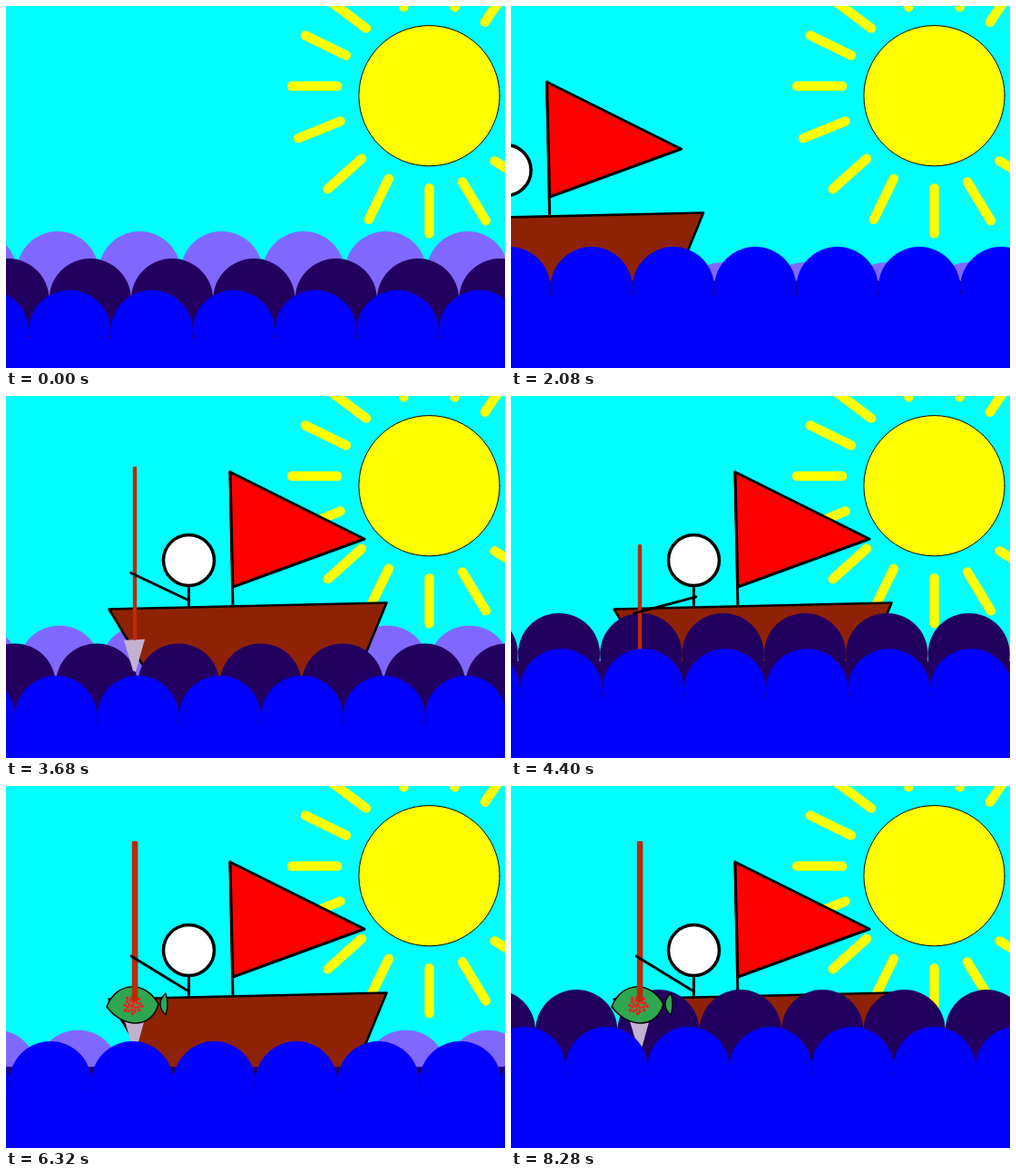
An HTML page with a canvas for the animation above (8320 ms loop, 550 px wide and 400 px high).

```html
<!DOCTYPE html>
<html lang="en">
<head>
<meta charset="utf-8">
<title>Boat and waves</title>
<style>
html, body { margin: 0; width: 100%; height: 100%; overflow: hidden; background: #0ff; }
canvas { display: block; }
</style>
</head>
<body>
<canvas id="stage" width="550" height="400"></canvas>
<script>
const ctx = document.getElementById('stage').getContext('2d');
const STEP = 40, LOOP = 208, PITCH = 90.35, CREST = 45.1;
const BEATS = [0, 29, 59, 89];
const ARRIVE = 89, TURN = 118, LANDED = 148;
const WOOD = '#bd2a08', FISH = '#2fa650';

const mix = (a, b, k) => a + (b - a) * k;
const ramp = (n, from, to) => Math.min(1, Math.max(0, (n - from) / (to - from)));
// Rises to 1 by "full", holds until the turn, then falls back.
const dip = (n, full) => n < TURN ? ramp(n, ARRIVE, full) : 1 - ramp(n, TURN, LANDED);

// Crest position on each beat; a row returns to its start, "turns" crests further on.
const back = { color: '#8068ff', turns: 1, path: [[57, 249], [76, 294], [45.4, 280]] };
const mid = { color: '#220060', turns: 0, path: [[92.7, 279], [162.5, 225], [230, 326]] };
const front = { color: '#00f', turns: 0, path: [[70.2, 314], [-75.3, 266], [-97.2, 266]] };

function line(x1, y1, x2, y2, width, color) {
  ctx.lineWidth = width;
  ctx.strokeStyle = color;
  ctx.lineCap = 'round';
  ctx.beginPath();
  ctx.moveTo(x1, y1);
  ctx.lineTo(x2, y2);
  ctx.stroke();
}

function paint(fill, width) {
  ctx.fillStyle = fill;
  ctx.fill();
  if (!width) return;
  ctx.lineWidth = width;
  ctx.strokeStyle = '#000';
  ctx.lineJoin = 'round';
  ctx.stroke();
}

function poly(points, fill, width) {
  ctx.beginPath();
  points.forEach(p => ctx.lineTo(...p));
  ctx.closePath();
  paint(fill, width);
}

function disc(x, y, r, fill, width) {
  ctx.beginPath();
  ctx.arc(x, y, r, 0, Math.PI * 2);
  paint(fill, width);
}

function shifted(dx, dy, body) {
  ctx.save();
  ctx.translate(dx, dy);
  body();
  ctx.restore();
}

function drawSun() {
  const cx = 466.5, cy = 99.2, rad = Math.PI / 180;
  // Where each ray starts around the sun, and which way it points
  const rays = [[45, 32], [69, 59], [90, 90], [116, 116], [137, 138], [164, 158],
    [186, 180], [206, 206], [227, 217], [254, 266], [286, 275], [307, 304]];
  for (const [place, aim] of rays) {
    const x = cx + 102 * Math.cos(place * rad), y = cy + 102 * Math.sin(place * rad);
    line(x, y, x + 50 * Math.cos(aim * rad), y + 50 * Math.sin(aim * rad), 10.5, '#ff0');
  }
  disc(cx, cy, 77.6, '#ff0', 1);
}

function drawWave({ color, turns, path }, n) {
  const step = n % ARRIVE;
  const i = step < BEATS[1] ? 0 : step < BEATS[2] ? 1 : 2;
  const [x0, y0] = path[i];
  const [x1, y1] = path[i + 1] || [path[0][0] + turns * PITCH, path[0][1]];
  const k = ramp(step, BEATS[i], BEATS[i + 1]);
  const x = mix(x0, x1, k), y = mix(y0, y1, k) + CREST;
  const first = (x % PITCH + PITCH) % PITCH - PITCH;
  for (let c = first; c < 550 + CREST; c += PITCH) disc(c, y, CREST, color);
  ctx.fillStyle = color;
  ctx.fillRect(0, y + 8, 550, 400);
}

function drawBoat() {
  line(201.5, 209, 201.5, 233, 3, '#000');
  disc(201.5, 181.5, 28, '#fff', 3.5);
  line(247, 84, 250, 232, 3, '#000');
  poly([[247, 84], [395, 158], [250, 211]], '#f00', 3);
  poly([[113.5, 235.5], [419.5, 228.5], [382, 320], [164.5, 320]], '#8f2205', 2.6);
}

function drawHead(x, top) {
  poly([[x - 12, top + 192], [x + 11, top + 191], [x + 1, top + 227], [x - 2, top + 226]], '#c2b2d0');
}

function drawShaft(x, top) {
  line(x, top + 2, x, top + 175, 4.4, WOOD);
}

function drawFish() {
  ctx.beginPath();
  ctx.moveTo(111, 244);
  ctx.bezierCurveTo(122, 215, 154, 215, 168, 241);
  ctx.bezierCurveTo(160, 270, 128, 267, 111, 244);
  paint(FISH, 1.5);
  ctx.beginPath();
  ctx.moveTo(176, 229);
  ctx.quadraticCurveTo(180, 241, 176, 253);
  ctx.quadraticCurveTo(164, 241, 176, 229);
  paint(FISH, 1.2);
  // Splatter: small dots on a spiral
  for (let i = 0; i < 24; i++) {
    const r = 2.2 * Math.sqrt(i), a = i * 2.4;
    disc(140 + r * Math.cos(a), 242 + r * Math.sin(a), 1.8, '#f21c24');
  }
}

function drawSpears(n) {
  const up = ramp(n, TURN, LANDED);
  const x = n < TURN ? mix(-398, 142, ramp(n, 0, ARRIVE)) : 141;
  const top = mix(n < TURN ? 63.5 : 61, 164, dip(n, 110));
  drawHead(x, top);
  if (n >= TURN) {
    const low = mix(320, 61, up);
    drawHead(143.5, low);
    shifted(0, low - 61, drawFish);
    drawShaft(143.2, low);
    drawShaft(x, top);
  } else {
    line(x, top + 2, x, top + 190, 4.4, WOOD);
  }
}

function drawArm(dx, n) {
  const reach = dip(n, TURN);
  line(dx + 138 - 3 * reach, 188 + 72 * reach, dx + 199 + 7 * reach, 225.5 - 5 * reach, 2.8, '#000');
}

function draw(n) {
  ctx.fillStyle = '#0ff';
  ctx.fillRect(0, 0, 550, 400);
  const dx = mix(-499, 0, ramp(n, 0, ARRIVE));
  drawSun();
  drawWave(back, n);
  shifted(dx, 0, drawBoat);
  drawWave(mid, n);
  drawSpears(n);
  drawArm(dx, n);
  drawWave(front, n);
}

const start = performance.now();
function tick() {
  draw(Math.floor((performance.now() - start) / STEP) % LOOP);
  requestAnimationFrame(tick);
}
tick();
</script>
</body>
</html>
```
